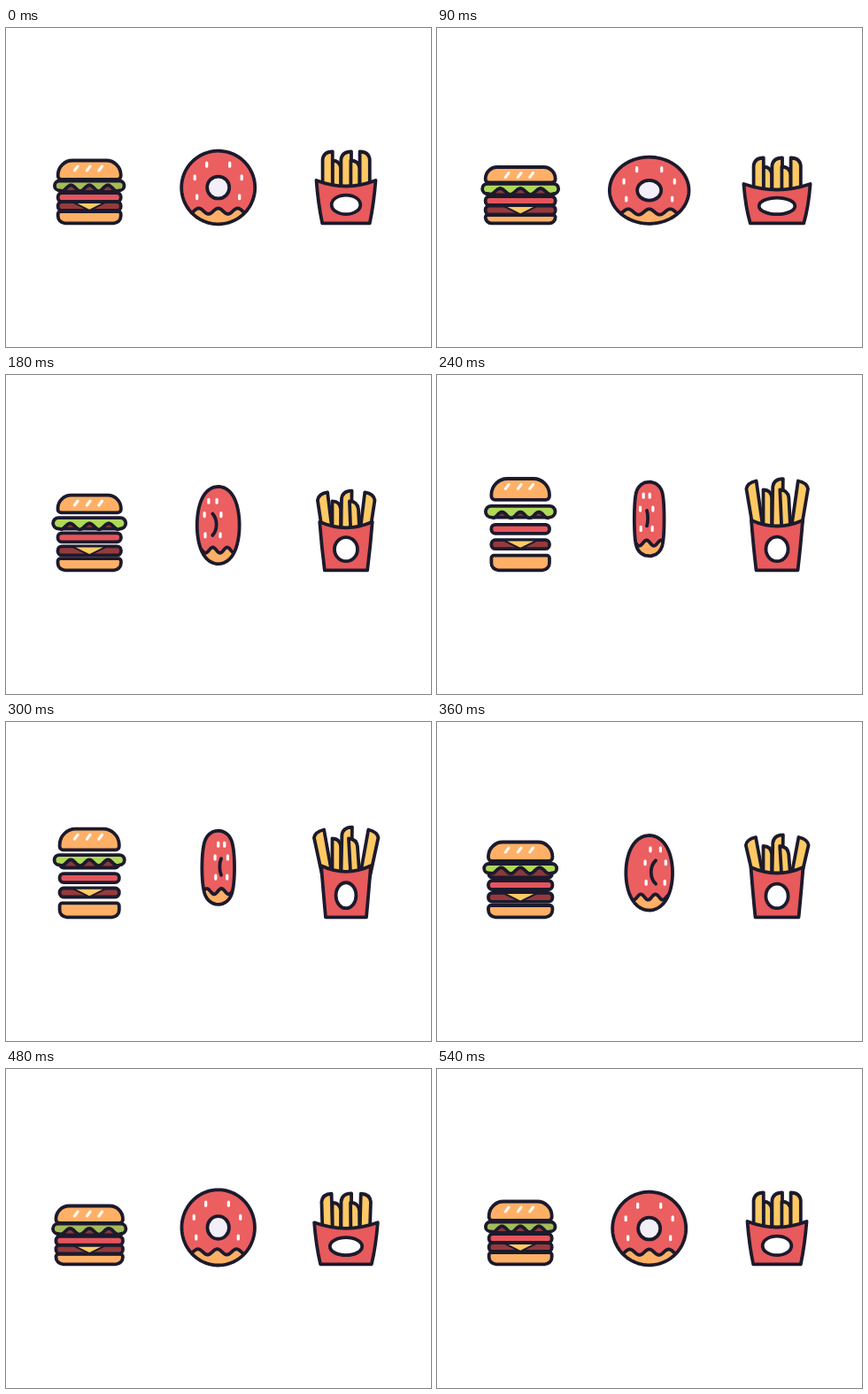
An HTML page with a canvas that plays this animation: 480x360 px, repeating every 0.72 s.

```html
<!DOCTYPE html>
<html lang="en">
<head>
<meta charset="utf-8">
<title>Jumping snacks</title>
<style>
html, body { margin: 0; width: 100%; height: 100%; overflow: hidden; background: #fff; }
canvas { display: block; }
</style>
</head>
<body>
<canvas id="stage" width="480" height="360"></canvas>
<script>
const ctx = document.getElementById('stage').getContext('2d');
const { PI, cos, sin, abs, min, max, hypot } = Math;
const INK = '#1c1a2c', RED = '#eb5f60', BUN = '#ffb066', FRY = '#ffc964', LINE = 3.8;
const LOOP = 720, STEP = 30, END = 540;
const times = [0, 90, 150, 240, 360, 420, END];

// Smooth curve through one value per key time, level at both ends.
function curve(...v) {
  if (v.length < times.length) v.push(v[0]);
  const slope = i => (v[i + 1] - v[i]) / (times[i + 1] - times[i]);
  const tangent = i => {
    if (i === 0 || i === v.length - 1) return 0;
    const a = times[i] - times[i - 1], b = times[i + 1] - times[i];
    return (slope(i - 1) * b + slope(i) * a) / (a + b);
  };
  return t => {
    let i = 0;
    while (i < v.length - 2 && t >= times[i + 1]) i++;
    const d = times[i + 1] - times[i], u = (t - times[i]) / d, w = 1 - u;
    return v[i] * (1 + 2 * u) * w * w + v[i + 1] * (3 - 2 * u) * u * u
      + d * u * w * (tangent(i) * w - tangent(i + 1) * u);
  };
}

const burger = {
  bunTop: curve(149.5, 157, 145.5, 117, 135.5, 153.8),
  bunBottom: curve(171, 174.5, 163.5, 140.8, 157, 172),
  half: curve(35.5, 39.5, 37.3, 32.8, 36.2, 39.3),
  leafTop: curve(172.5, 175.8, 168, 147.8, 160, 172.5),
  leafBottom: curve(183.3, 187, 180, 160.6, 170.3, 184),
  leafHalf: curve(39.3, 43, 42, 39.3, 41, 42.8),
  beef: curve(185, 188.5, 180.5, 160.6, 175.5, 186.5),
  tomato: curve(186, 190, 183.5, 168.8, 179, 188.5),
  patty: curve(196, 200.5, 197, 186.2, 192.8, 199),
  base: curve(207, 211, 209, 203.7, 207, 210)
};
const donut = {
  top: curve(138.7, 145.7, 131, 120.5, 128, 132),
  bottom: curve(221.3, 220.8, 217.3, 204.5, 212.5, 221.3),
  width: curve(1, 1.08, 1, 1, 1, 1),
  turn: curve(0, 0, 54, 85, 116, 150, 180),
  shift: curve(0, 0, -6, -3, 7, 0)
};
const fries = {
  rim: curve(172, 176, 168, 164, 164, 172),
  rimHalf: curve(33.5, 37.6, 31.2, 29, 29.5, 36.2),
  baseHalf: curve(26.8, 30.2, 25.3, 23.5, 24.5, 29.5),
  top: curve(139.5, 146.5, 139, 119.5, 130, 139),
  spread: curve(0, 0, 4, 8.2, 8.8, 4.2),
  labelX: curve(16.3, 20.3, 14.3, 12.5, 12.6, 18.3),
  labelY: curve(10.8, 9.3, 12.8, 13.8, 13.8, 10.3)
};
const poseAt = (tracks, t) =>
  Object.fromEntries(Object.entries(tracks).map(([name, f]) => [name, f(t)]));

function paint(fill, path, width = LINE) {
  if (fill) { ctx.fillStyle = fill; ctx.fill(path); }
  ctx.lineWidth = width;
  ctx.strokeStyle = INK;
  ctx.stroke(path);
}
function bar(fill, cx, half, top, bottom, radii) {
  const path = new Path2D();
  path.roundRect(cx - half, top, 2 * half, bottom - top, radii);
  paint(fill, path);
}
function dash(x, y, dx, dy) {
  ctx.strokeStyle = '#fff';
  ctx.lineWidth = 3.2;
  ctx.beginPath();
  ctx.moveTo(x - dx, y - dy);
  ctx.lineTo(x + dx, y + dy);
  ctx.stroke();
}

function drawBurger(t) {
  const p = poseAt(burger, t), cx = 94.2;
  bar(BUN, cx, p.half, p.base, 220.3, [3, 3, 8, 8]);
  bar('#963a3c', cx, p.half, p.patty, p.patty + 10, 4.5);
  paint(FRY, new Path2D(`M${cx - 19.5} ${p.patty + .2}h39l-19.5 9.6z`), 2);
  bar('#e5555b', cx, p.half, p.tomato, p.tomato + 10, 4.5);
  bar('#8a383c', cx, p.half - .5, p.leafTop + 3, p.beef, 4);

  // Leaf bar whose lower edge is cut by three round notches.
  const leaf = new Path2D(), period = p.leafHalf * .53;
  const r = (p.leafBottom - p.leafTop) / 2, mid = p.leafTop + r;
  leaf.moveTo(cx + p.leafHalf - r, p.leafTop);
  leaf.arc(cx + p.leafHalf - r, mid, r, -PI / 2, PI / 2);
  for (let x = 1.5; x >= -1.5; x -= .05)
    leaf.lineTo(cx + x * period, p.leafBottom - 2.6 - 3.4 * cos(2 * PI * x));
  leaf.arc(cx - p.leafHalf + r, mid, r, PI / 2, PI * 1.5);
  leaf.closePath();
  paint(t > 0 && t < 400 ? '#afd957' : '#a5bc5a', leaf);

  const round = (p.bunBottom - p.bunTop) * .76;
  bar(BUN, cx, p.half, p.bunTop, p.bunBottom, [round, round, 4, 4]);
  for (const x of [-15, -1, 12.5]) dash(cx + x, p.bunTop + 9, 1.8, -2.4);
}

function drawDonut(t) {
  const p = poseAt(donut, t), cx = 239.7, ring = 27, tube = 14.5;
  const bottom = min(p.bottom, 221.5), cy = (p.top + bottom) / 2;
  const sy = (bottom - p.top) / 83, c = cos(max(0, p.turn) * PI / 180), flat = abs(c);

  // Silhouette of a turned torus: an ellipse grown outward by the tube radius.
  const body = new Path2D();
  for (let a = 0; a < 2 * PI; a += .04) {
    const n = hypot(cos(a), flat * sin(a)) || 1;
    body.lineTo(cx + p.width * (ring * flat * cos(a) + tube * cos(a) / n),
      cy + sy * (ring * sin(a) + tube * flat * sin(a) / n));
  }
  body.closePath();

  // The glaze edge and the sprinkles narrow and slide as the ring turns.
  const wave = new Path2D(), period = 22 * max(flat, .75) * p.width;
  for (let x = -50; x <= 50; x++)
    wave.lineTo(cx + p.shift + x, cy + 26.8 * sy - 3.2 * cos(x * 2 * PI / period));
  const glaze = new Path2D(wave);
  glaze.lineTo(cx + 60, cy - 60);
  glaze.lineTo(cx - 60, cy - 60);
  glaze.closePath();

  ctx.fillStyle = BUN;
  ctx.fill(body);
  ctx.save();
  ctx.clip(body);
  paint(RED, glaze);
  ctx.restore();
  paint(null, body);

  const spread = max(flat, .27) * p.width;
  for (const [x, y] of [[13, -26], [26.5, -11.3], [24, 10.8]])
    for (const side of [-1, 1])
      dash(cx + p.shift + side * x * spread, cy + y * sy, 0, 2);

  const hole = new Path2D();
  if (flat > .7) {
    hole.ellipse(cx, cy, (ring * flat - tube) * p.width, 12.5 * sy, 0, 0, 2 * PI);
    paint('#f3eff8', hole);
  } else {
    const bend = 12 * c, h = 7.5 + 13 * flat, x = cx + p.shift * .75 - bend * .4;
    const pull = x + bend * 4 / 3, y = cy - .8;
    hole.moveTo(x, y - h);
    hole.bezierCurveTo(pull, y - h * .5, pull, y + h * .5, x, y + h);
    paint(null, hole);
  }
}

function drawFries(t) {
  const p = poseAt(fries, t), cx = 384, foot = p.rim + 13;
  // x, half width, lean, height offset, side of the rounded corner
  const sticks = [
    [-10.7, 4.8, 0, 10, 1], [-20.8, 5.6, -1, 0, -1], [.2, 5.8, .1, -p.spread * .3, -1],
    [10.4, 5, -.25, 10, 1], [21.2, 5.6, 1, 0, 1]
  ];
  for (const [x, half, lean, drop, side] of sticks) {
    const top = p.top + drop, mid = cx + x + lean * p.spread, low = cx + x;
    const stick = new Path2D();
    stick.moveTo(low - side * half, foot);
    stick.lineTo(mid - side * half, top);
    stick.quadraticCurveTo(mid + side * half * .8, top + abs(lean) * p.spread * .25,
      mid + side * half, top + 9);
    stick.lineTo(low + side * half, foot);
    paint(FRY, stick);
    if (x > 20 && t > 380 && t < 440) {
      ctx.save();
      ctx.clip(stick);
      ctx.fillStyle = '#fff';
      ctx.fillRect(low - 5, p.rim - 19, 20, 40);
      ctx.restore();
      paint(null, stick);
    }
  }
  const l = cx - p.rimHalf, r = cx + p.rimHalf, floor = 220.4;
  paint('#e85a5c', new Path2D(`M${l} ${p.rim}Q${cx} ${p.rim + 13} ${r} ${p.rim}` +
    `Q${r - 2} ${p.rim + 26} ${cx + p.baseHalf} ${floor}H${cx - p.baseHalf}` +
    `Q${l + 2} ${p.rim + 26} ${l} ${p.rim}z`));
  const label = new Path2D();
  label.ellipse(cx, 210.2 - p.labelY, p.labelX, p.labelY, 0, 0, 2 * PI);
  paint('#fff', label);
}

function frame() {
  const t = min(END, Math.floor(performance.now() % LOOP / STEP) * STEP);
  ctx.fillStyle = '#fff';
  ctx.fillRect(0, 0, 480, 360);
  ctx.lineJoin = ctx.lineCap = 'round';
  drawBurger(t);
  drawDonut(t);
  drawFries(t);
  requestAnimationFrame(frame);
}
frame();
</script>
</body>
</html>
```
